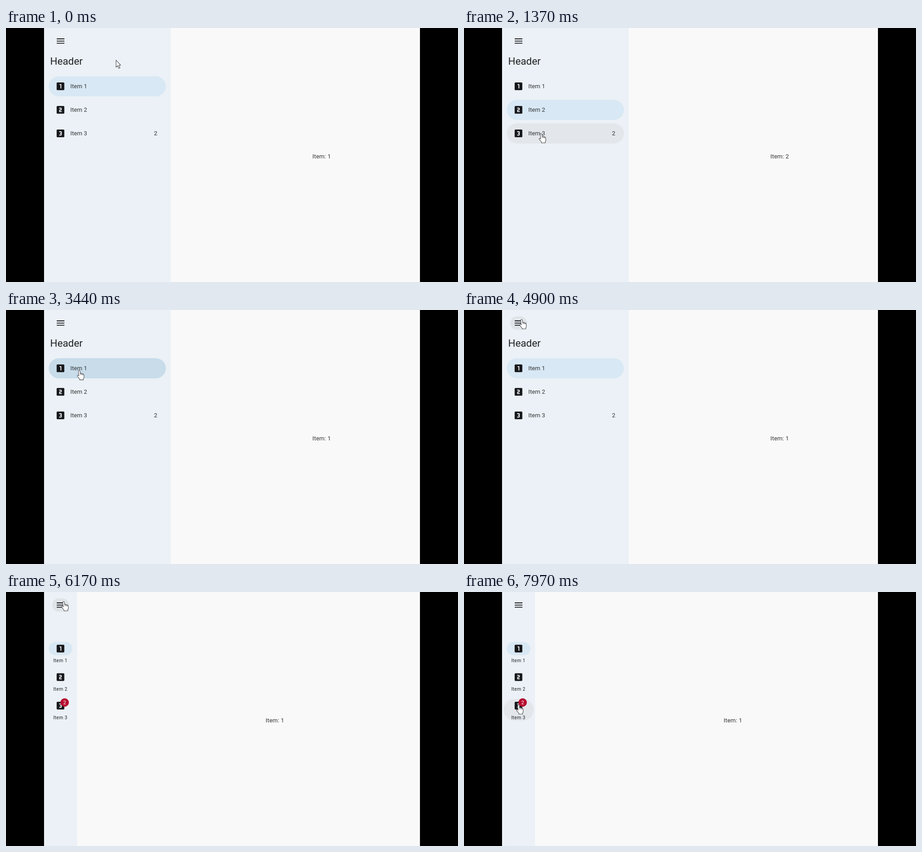
An HTML page that plays this animation: 998x561 px, repeating every 8 s.

```html
<!DOCTYPE html>
<html lang="en">
<head>
<meta charset="utf-8">
<title>Navigation rail</title>
<style>
  html, body { margin: 0; width: 100%; height: 100%; overflow: hidden; background: #000; }
  svg { display: block; width: 998px; height: 561px; font-family: Roboto, sans-serif; fill: #1f2023; }
  .label { font-size: 13px; letter-spacing: .1px; fill: #313336; }
  .small { font-size: 10.2px; letter-spacing: .42px; text-anchor: middle; }
  .middle { text-anchor: middle; }
  .cursor path { fill: #fff; stroke: #46474a; stroke-width: 1.1; stroke-linejoin: round; }
  .cursor .crease { fill: none; stroke-width: .9; }
</style>
</head>
<body>
<svg id="stage" viewBox="0 0 998 561"></svg>
<script>
const LOOP = 8000;
const LEFT = 84, RIGHT = 914;
const stage = document.getElementById('stage');

function add(tag, attrs = {}, parent = stage, text = '') {
  const node = document.createElementNS('http://www.w3.org/2000/svg', tag);
  set(node, attrs);
  node.textContent = text;
  return parent.appendChild(node);
}
function set(node, attrs) {
  for (const key in attrs) node.setAttribute(key, attrs[key]);
}
const mix = (a, b, p) => a + (b - a) * p;
const clamp = v => Math.min(1, Math.max(0, v));
const ease = v => v * v * (3 - 2 * v);
const visible = on => ({ opacity: on ? 1 : 0 });

// Pointer stops: time, x, y.
const route = [
  [0, 243, 71], [120, 242, 74], [560, 174, 183], [950, 174, 183],
  [1260, 170, 233], [1880, 170, 233], [2340, 161.5, 134], [3620, 161.5, 133.5],
  [4350, 127, 21], [6700, 127, 21], [7120, 121, 126], [7420, 120, 188],
  [7820, 120, 249], [8000, 120, 249]
];
// Selected row from each time on.
const clicks = [[0, 0], [780, 1], [1640, 2], [2760, 0]];
const collapse = { start: 5150, length: 450 };

const digits = [
  'M10 8h3v9',
  'M9 8h4q1 0 1 1v2q0 1-1 1h-2q-1 0-1 1v3h5',
  'M9 8h4q1 0 1 1v2q0 1-1 1h-2m2 0q1 0 1 1v2q0 1-1 1h-4'
];

add('rect', { x: LEFT, width: RIGHT - LEFT, height: 561, fill: '#f9f9f9' });
const rail = add('rect', { x: LEFT, height: 561, fill: '#ebf1f6' });
const menuHover = add('rect', { x: 102, y: 14, width: 37, height: 29.5, rx: 14.75, fill: '#dfe4e8' });
add('path', { d: 'M112 24h17m-17 4.8h17m-17 4.8h17', stroke: '#17181b', 'stroke-width': 1.8 });
const header = add('text', { x: 97.5, y: 81, 'font-size': 22.3 }, stage, 'Header');

const rows = digits.map((digit, i) => {
  const row = { pill: add('rect'), hover: add('rect') };
  row.icon = add('g');
  add('rect', { x: 3, y: 3, width: 18, height: 18, rx: 2, fill: '#17181c' }, row.icon);
  add('path', { d: digit, fill: 'none', stroke: '#f1f5f8', 'stroke-width': 2 }, row.icon);
  row.label = add('text', { x: 142, y: 133 + 52 * i, class: 'label' }, stage, `Item ${i + 1}`);
  row.small = add('text', { x: 120, y: 154.8 + 63 * i, class: 'small' }, stage, `Item ${i + 1}`);
  return row;
});

const count = add('text', { x: 330.5, y: 237, class: 'label middle' }, stage, '2');
const badge = add('g');
add('circle', { cx: 129.5, cy: 244, r: 9.3, fill: '#b70c30' }, badge);
add('text', { x: 129.5, y: 247.8, class: 'middle', 'font-size': 11, fill: '#fff' }, badge, '2');
const content = add('text', { y: 288, class: 'label middle', style: 'letter-spacing:.2px' });

const arrow = add('g', { class: 'cursor' });
add('path', { d: 'M0 0V15.5L3.5 12.3L6.2 18.2L8.7 17L6.1 11.2H10.2Z' }, arrow);
const hand = add('g', { class: 'cursor' });
add('path', { d: 'M-1.8 2Q-1.8 0 0 0Q1.7 0 1.9 2L2.6 6.6Q4.3 5.4 5.3 7.1Q7 6.2 7.8 8Q9.8 7.3 10.3 9.5L10.8 14Q10.9 16.5 9.4 18.3V20.8H1.2V19L-3.6 13.2Q-4.8 11.2-3 10.5Q-1.7 10.2-.5 12Z' }, hand);
add('path', { class: 'crease', d: 'M2.6 6.6L3.1 10M5.3 7.1L5.8 10.3M7.8 8L8.2 10.8' }, hand);

function pointerAt(t) {
  const next = Math.max(1, route.findIndex(stop => stop[0] > t));
  const [t0, x0, y0] = route[next - 1];
  const [t1, x1, y1] = route[next];
  const p = ease((t - t0) / (t1 - t0));
  return [mix(x0, x1, p), mix(y0, y1, p)];
}

function draw(t) {
  const p = ease(clamp((t - collapse.start) / collapse.length));
  const [px, py] = pointerAt(t);
  const selected = clicks.filter(click => click[0] <= t).pop()[1];
  const inside = (x, y, w, h) => px >= x && px <= x + w && py >= y && py <= y + h;
  const fadeOut = clamp(1 - p * 2), fadeIn = clamp(p * 2 - 1);
  const edge = mix(363.5, 157, p);

  set(rail, { width: edge - LEFT });
  set(header, { opacity: fadeOut });
  set(count, { opacity: fadeOut });
  set(badge, { opacity: fadeIn });
  set(content, { x: edge / 2 + 515.3 });
  content.textContent = `Item: ${selected + 1}`;

  const onMenu = inside(102, 14, 37, 29.5);
  let active = onMenu;
  set(menuHover, visible(onMenu));

  rows.forEach((row, i) => {
    const y = mix(128.8 + 52 * i, 125 + 63 * i, p);
    const pillHeight = mix(44.5, 29, p);
    const hoverX = mix(94.5, 87.5, p), hoverWidth = mix(258.5, 66.5, p);
    const hoverY = mix(y - 22.2, y - 14.8, p), hoverHeight = mix(44.5, 48, p);
    const hovered = inside(hoverX, hoverY, hoverWidth, hoverHeight);
    active = active || hovered;
    set(row.pill, {
      x: 94.5, y: y - pillHeight / 2, width: mix(258.5, 52, p), height: pillHeight,
      rx: pillHeight / 2, fill: '#d8e8f4', ...visible(i === selected)
    });
    set(row.hover, {
      x: hoverX, y: hoverY, width: hoverWidth, height: hoverHeight, rx: hoverHeight / 2,
      fill: i === selected ? '#98b8cc' : '#d2d4d8', opacity: hovered ? (i === selected ? .25 : .36) : 0
    });
    set(row.icon, { transform: `translate(120.3 ${y}) scale(.94) translate(-12 -12)` });
    set(row.label, { opacity: fadeOut });
    set(row.small, { opacity: fadeIn });
  });

  const place = { transform: `translate(${px} ${py})` };
  set(arrow, { ...place, ...visible(!active) });
  set(hand, { ...place, ...visible(active) });
}

const start = performance.now();
function tick() {
  draw((performance.now() - start) % LOOP);
  requestAnimationFrame(tick);
}
tick();
</script>
</body>
</html>
```
